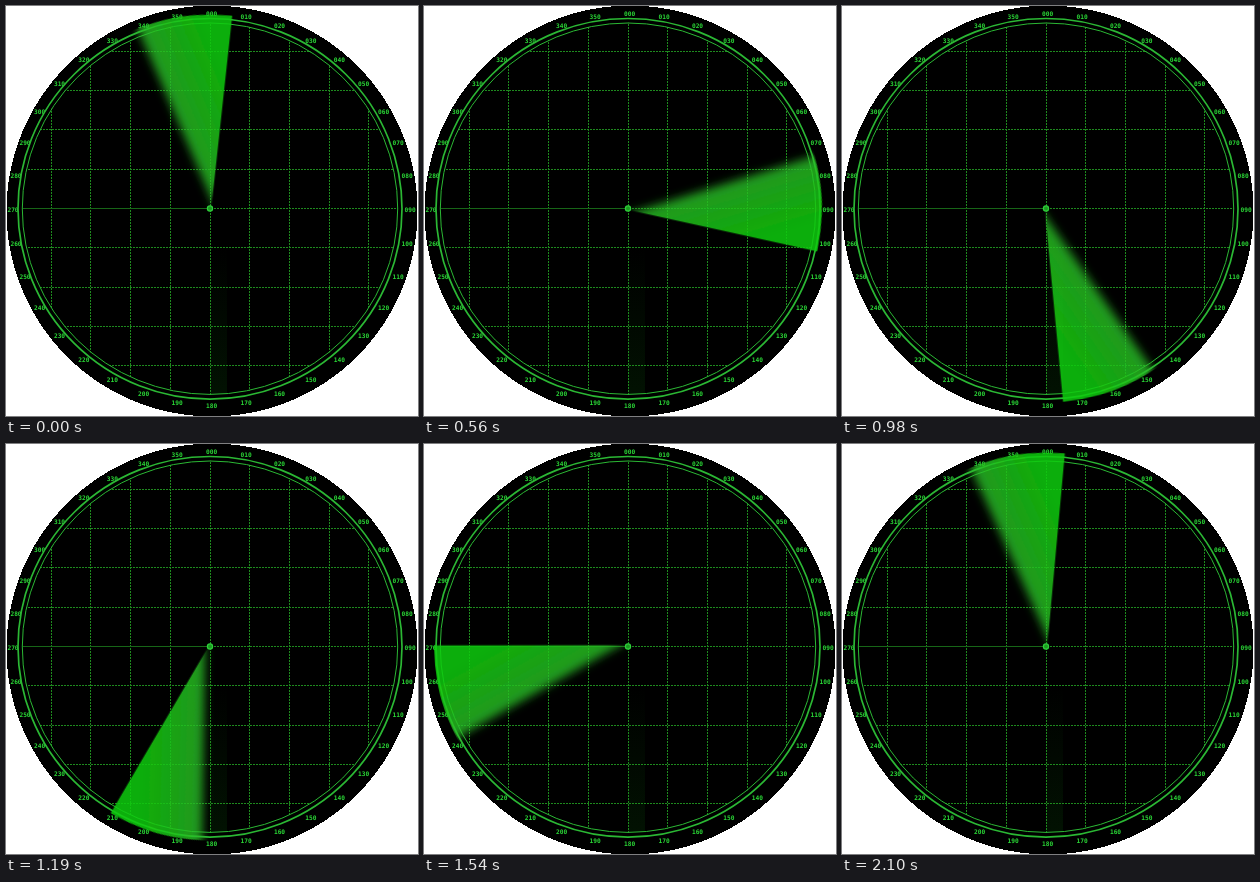
An HTML page for the animation above (2.17 s loop, 412 by 410 pixels).

```html
<!DOCTYPE html>
<html lang="en">
<head>
<meta charset="utf-8">
<title>Radar sweep</title>
<style>
  html, body { margin: 0; width: 100%; height: 100%; overflow: hidden; background: #fff; }
  svg { position: absolute; left: 0; top: 0; }
  .grid line { stroke: #1e8a1e; stroke-width: 1; stroke-dasharray: 2 1; }
  .grid .axis { stroke: #176617; stroke-dasharray: none; }
  .ring { stroke: #2bb834; }
  .labels { fill: #2ad836; font: bold 6.2px "DejaVu Sans Mono", monospace; text-anchor: middle; }
  .sweep { transform-origin: 0 0; animation: sweep 2170ms infinite; }
  /* 31 poses of 70 ms; the turn slows very slightly in the second half */
  @keyframes sweep {
    0% { transform: rotate(6.2deg); animation-timing-function: steps(15, end); }
    48.3871% { transform: rotate(186.6deg); animation-timing-function: steps(16, end); }
    100% { transform: rotate(377.1deg); }
  }
</style>
</head>
<body>
<svg width="412" height="410">
  <defs>
    <clipPath id="scope"><ellipse cx="204" cy="202.7" rx="188" ry="186"/></clipPath>
    <clipPath id="beam"><path d="M1.3 4 V-194 A194 194 0 0 0 -194 0 V4 Z"/></clipPath>
    <filter id="soft" filterUnits="userSpaceOnUse" x="-220" y="-270" width="300" height="300">
      <feGaussianBlur stdDeviation="5"/>
    </filter>
    <linearGradient id="tail" gradientUnits="userSpaceOnUse" x1="0" y1="0" x2="61" y2="-34">
      <stop offset="0" stop-color="#2cbc2a" stop-opacity=".8"/>
      <stop offset="1" stop-color="#0ecb08" stop-opacity=".86"/>
    </linearGradient>
    <linearGradient id="glow" x2="0" y2="1">
      <stop offset="0" stop-color="#0a5a0a" stop-opacity="0"/>
      <stop offset="1" stop-color="#0a5a0a" stop-opacity=".2"/>
    </linearGradient>
  </defs>
  <circle cx="206" cy="205" r="205.5" shape-rendering="crispEdges"/>
  <g class="labels" id="labels"></g>
  <ellipse class="ring" cx="204" cy="202.8" rx="192" ry="190.3" stroke-width="1.7"/>
  <g clip-path="url(#scope)">
    <rect x="204" y="240" width="17" height="150" fill="url(#glow)"/>
    <g class="grid" id="grid"></g>
  </g>
  <ellipse class="ring" cx="204" cy="202.7" rx="187.7" ry="185.7" fill="none" stroke-width="1"/>
  <g transform="translate(204 202.5)">
    <g class="sweep">
      <g clip-path="url(#beam)">
        <path d="M4.4 -2.5 L-114 -211 L40 -250 V-2.5 Z" fill="url(#tail)" filter="url(#soft)"
              color-interpolation-filters="sRGB"/>
      </g>
    </g>
  </g>
  <circle cx="204" cy="202.5" r="2.6" fill="#1d9a22" stroke="#2ed03a" stroke-width="1.2"/>
</svg>
<script>
  const SVG = "http://www.w3.org/2000/svg";

  function add(parent, tag, attrs, text = "") {
    const node = document.createElementNS(SVG, tag);
    for (const key in attrs) node.setAttribute(key, attrs[key]);
    node.textContent = text;
    parent.append(node);
  }

  const grid = document.getElementById("grid");
  for (let i = -4; i <= 4; i++) {
    const x = Math.floor(204 + i * 39.7) + 0.5;
    const y = Math.floor(202.4 + i * 39.3) + 0.5;
    add(grid, "line", { x1: x, x2: x, y1: 12, y2: 394 });
    add(grid, "line", { x1: 10, x2: 398, y1: y, y2: y });
  }
  add(grid, "line", { class: "axis", x1: 10, x2: 204, y1: 202.5, y2: 202.5 });

  const labels = document.getElementById("labels");
  for (let deg = 0; deg < 360; deg += 10) {
    const a = deg * Math.PI / 180;
    const x = 205.6 + 198.6 * Math.sin(a);
    const y = 206.2 - 196 * Math.cos(a);
    add(labels, "text", { x: x.toFixed(1), y: y.toFixed(1) }, String(deg).padStart(3, "0"));
  }
</script>
</body>
</html>
```
